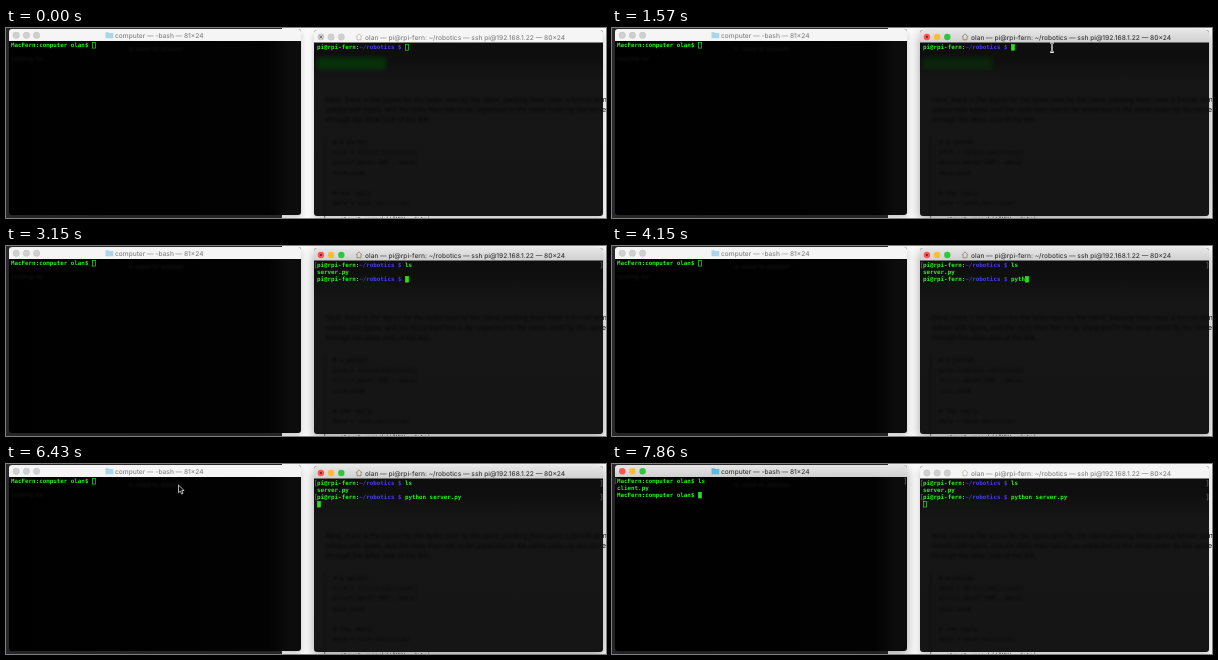
These frames come from a looping animation (600 by 190 pixels, 8000 ms). An HTML page:

```html
<!DOCTYPE html>
<html lang="en">
<head>
<meta charset="utf-8">
<title>Two terminals</title>
<style>
  html, body { margin: 0; width: 100%; height: 100%; overflow: hidden; background: #fff; }
  svg { display: block; width: 600px; height: 190px; }
  text { white-space: pre; text-rendering: geometricPrecision; }
  .title { font: 500 6.6px Inter, "Open Sans", sans-serif; fill: #858585; }
  .term { font: bold 5.85px "DejaVu Sans Mono", monospace; fill: #28f01c; }
  .path { fill: #4a3df2; }
  .mark { fill: none; stroke: #6c766c; stroke-width: .6; }
  .cursor { fill: none; stroke: #28e01c; stroke-width: .7; }
  .bar { fill: #f5f5f5; }
  .light { fill: #d0d0d0; stroke: #bcbcbc; stroke-width: .4; }
  .icon { opacity: .5; }
  .shade { filter: drop-shadow(0 3px 3px rgba(0, 0, 0, .2)); }
  .focus .shade { filter: drop-shadow(0 4px 6px rgba(0, 0, 0, .35)); }
  .focus .bar { fill: url(#barFill); }
  .focus .title { fill: #383838; }
  .focus .icon { opacity: 1; }
  .focus .cursor { fill: #28e01c; }
  .focus .light { stroke: none; }
  .focus .light:nth-of-type(1) { fill: #fc5450; }
  .focus .light:nth-of-type(2) { fill: #fdbc34; }
  .focus .light:nth-of-type(3) { fill: #30c63c; }
  #busy { fill: none; }
  .focus #busy { fill: #7c1512; }
  .doc { font: 7.2px "Liberation Sans", sans-serif; fill: #000; }
  .blur { filter: blur(.9px); opacity: .75; }
  .code { font: 5.8px "DejaVu Sans Mono", monospace; }
</style>
</head>
<body>
<svg viewBox="0 0 600 190">
  <defs>
    <linearGradient id="barFill" x2="0" y2="1">
      <stop stop-color="#e6e6e6"/><stop offset="1" stop-color="#d0d0d0"/>
    </linearGradient>
    <linearGradient id="glass" x2="0" y2="1">
      <stop stop-color="#0d0d0d"/><stop offset=".16" stop-color="#0f0f0f"/>
      <stop offset=".28" stop-color="#161616"/><stop offset="1" stop-color="#151515"/>
    </linearGradient>
    <linearGradient id="edge">
      <stop stop-color="#000"/><stop offset=".89" stop-color="#020202"/>
      <stop offset=".96" stop-color="#0c0c0c"/><stop offset="1" stop-color="#0c0c0c"/>
    </linearGradient>
    <clipPath id="pane"><rect x="308" y="14" width="289" height="174"/></clipPath>
  </defs>

  <!-- desktop and page behind the windows -->
  <rect width="600" height="190" fill="#fbfbfb"/>
  <rect width="276" height="190" fill="#2b2b2d"/>
  <g class="doc" id="page"></g>
  <text class="code" x="320" y="192.5" fill="#333"><tspan fill="#3a8a3a">&gt;&gt;&gt;</tspan> struct.unpack('IHH', data)</text>

  <g id="left">
    <rect class="shade" x="3" y="1" width="292" height="186" rx="3" fill="url(#edge)"/>
    <g class="doc blur" style="fill:#1c1c1c">
      <text x="122" y="23">is used to answer</text>
      <text x="5" y="33">waiting for</text>
    </g>
    <path class="bar" d="M3 13V4a3 3 0 0 1 3-3H292a3 3 0 0 1 3 3V13Z"/>
    <g>
      <circle class="light" cx="10.2" cy="7.3" r="3.2"/>
      <circle class="light" cx="20.4" cy="7.3" r="3.2"/>
      <circle class="light" cx="30.6" cy="7.3" r="3.2"/>
    </g>
    <path class="icon" d="M99.5 4.2h3l.8.9h4v5.2h-7.8Z" fill="#62b5dc"/>
    <text class="title" x="109" y="9.7">computer — -bash — 81×24</text>
    <g class="term" id="leftText"></g>
  </g>

  <g id="right">
    <rect class="shade" x="308" y="2" width="289" height="186" rx="3" fill="url(#glass)"/>
    <rect id="glow" x="311" y="29.5" width="69" height="12" fill="#063a08" style="filter:blur(2px)"/>
    <g clip-path="url(#pane)"><g class="doc blur" id="through"></g></g>
    <path class="bar" d="M308 14.5V5a3 3 0 0 1 3-3H594a3 3 0 0 1 3 3V14.5Z"/>
    <g>
      <circle class="light" cx="314.9" cy="9" r="3.2"/>
      <circle class="light" cx="325.1" cy="9" r="3.2"/>
      <circle class="light" cx="335.3" cy="9" r="3.2"/>
    </g>
    <circle id="busy" cx="314.9" cy="9" r="1.1"/>
    <path id="cross" d="M313.5 7.6l2.8 2.8m0-2.8l-2.8 2.8" stroke="#555" stroke-width=".8"/>
    <path class="icon" d="M349.8 9l3.2-3.2l3.2 3.2M351 8.4v3.4h4v-3.4" fill="none" stroke="#8b7d68" stroke-width=".8"/>
    <text class="title" x="359" y="11.5">olan — pi@rpi-fern: ~/robotics — ssh pi@192.168.1.22 — 80×24</text>
    <g class="term" id="rightText"></g>
  </g>

  <path id="arrow" d="M0 0V7.6L1.8 6L3.1 8.9L4.5 8.3L3.2 5.5H5.6Z" fill="#000" stroke="#fff" stroke-width=".7"/>
  <g id="beam" fill="none">
    <path id="stem" d="M-2-4.6Q0-4.6 0-3.4Q0-4.6 2-4.6M0-3.6V3.6M-2 4.6Q0 4.6 0 3.4Q0 4.6 2 4.6" stroke="#fff" stroke-width="1.7"/>
    <path d="M-2-4.6Q0-4.6 0-3.4Q0-4.6 2-4.6M0-3.6V3.6M-2 4.6Q0 4.6 0 3.4Q0 4.6 2 4.6" stroke="#222" stroke-width=".6"/>
  </g>
</svg>
<script>
const LOOP = 8000, RATE = 7, PITCH = 3.522, LEADING = 6.95;
const $ = id => document.getElementById(id);

const leftPrompt = { html: 'MacFern:computer olan$ ', size: 23 };
const rightPrompt = { html: 'pi@rpi-fern:<tspan class="path">~/robotics $ </tspan>', size: 25 };

// [step, typed text] pairs; the last one reached applies
const rightLs = [[15, 'l'], [16, 'ls']];
const rightRun = [[24, 'p'], [26, 'py'], [29, 'pyth'], [30, 'pytho'], [31, 'python'],
  [32, 'python '], [33, 'python s'], [34, 'python se'], [35, 'python ser'], [36, 'python server.py ']];
const leftLs = [[49, 'l'], [50, 'ls']];

function command(prompt, keys, k, enter) {
  const text = keys.reduce((s, [at, typed]) => k >= at ? typed : s, '');
  return { html: prompt.html + text, size: prompt.size + text.length, done: k >= enter };
}

const plain = s => ({ html: s, size: s.length });

function rightLines(k) {
  const lines = [command(rightPrompt, rightLs, k, 18)];
  if (k >= 18) lines.push(plain('server.py'), command(rightPrompt, rightRun, k, 37));
  if (k >= 37) lines.push(plain(''));
  return lines;
}

function leftLines(k) {
  const lines = [command(leftPrompt, leftLs, k, 52)];
  if (k >= 52) lines.push(plain('client.py'), leftPrompt);
  return lines;
}

function terminal(lines, x, y, end) {
  const rows = lines.map((line, i) => {
    const base = y + i * LEADING;
    const marks = line.done
      ? `<path class="mark" d="M${x - .3} ${base - 4.8}h-1.3v5.6h1.3M${end - 1.3} ${base - 4.8}h1.3v5.6h-1.3"/>` : '';
    return `<text x="${x}" y="${base}">${line.html}</text>${marks}`;
  });
  const last = lines.length - 1;
  const cx = x + lines[last].size * PITCH + .4, cy = y + last * LEADING - 4.7;
  return rows.join('') + `<rect class="cursor" x="${cx}" y="${cy}" width="3" height="5.7"/>`;
}

const ease = p => p * p * (3 - 2 * p);
const mix = (a, b, p) => a + (b - a) * p;
const span = (k, a, b) => ease(Math.min(1, Math.max(0, (k - a) / (b - a))));

function pointer(k) {
  if (k >= 3 && k < 15) {
    const p = span(k, 2, 8);
    return { shape: k < 11 ? 'arrow' : 'beam', x: mix(400, 440, p), y: mix(192, 19.5, p) };
  }
  if (k >= 43 && k < 49) {
    const p = span(k, 42, 46), x = mix(440, 123, p);
    return { shape: x > 308 || k >= 46 ? 'beam' : 'arrow', x, y: mix(24, 20.5, p) };
  }
  return { shape: '' };
}

function draw(k) {
  $('right').classList.toggle('focus', k >= 11 && k < 46);
  $('left').classList.toggle('focus', k >= 46);
  $('cross').style.display = k < 11 ? '' : 'none';
  $('glow').style.opacity = k < 11 ? .8 : k < 18 ? .5 : .12;
  $('leftText').innerHTML = terminal(leftLines(k), 5, 19.1, 293.5);
  $('rightText').innerHTML = terminal(rightLines(k), 311, 21.2, 595.8);
  const m = pointer(k);
  for (const id of ['arrow', 'beam']) {
    $(id).style.display = m.shape === id ? '' : 'none';
    if (m.shape === id) $(id).setAttribute('transform', `translate(${m.x} ${m.y})`);
  }
}

// page dimly visible through the glass, sharp beside it
const prose = ['Next, there is the layout for the bytes sent by the client; packing them uses a format string, and each of',
  'values with types, and the reply then has to be unpacked in the same order by the server that is listening for',
  'through the other side of the link.'];
const sample = ['# a packet', 'size = struct.calcsize()', "struct.pack('IHH', data)", 'sock.send', '',
  '# the reply', 'data = sock.recv(size)'];
$('page').innerHTML = $('through').innerHTML =
  prose.map((s, i) => `<text x="320" y="${73.5 + i * 10.3}">${s}</text>`).join('') +
  sample.map((s, i) => `<text class="code" x="327" y="${116 + i * 10.2}">${s}</text>`).join('') +
  '<rect x="318" y="108" width="1.2" height="82" opacity=".4"/>';

const start = performance.now();
let shown = -1;
function tick(now) {
  const time = Math.max(0, now - start) % LOOP;
  const k = Math.floor(time * RATE / 1000 + .02) % (LOOP * RATE / 1000);
  if (k !== shown) draw(shown = k);
  requestAnimationFrame(tick);
}
tick(start);
</script>
</body>
</html>
```
